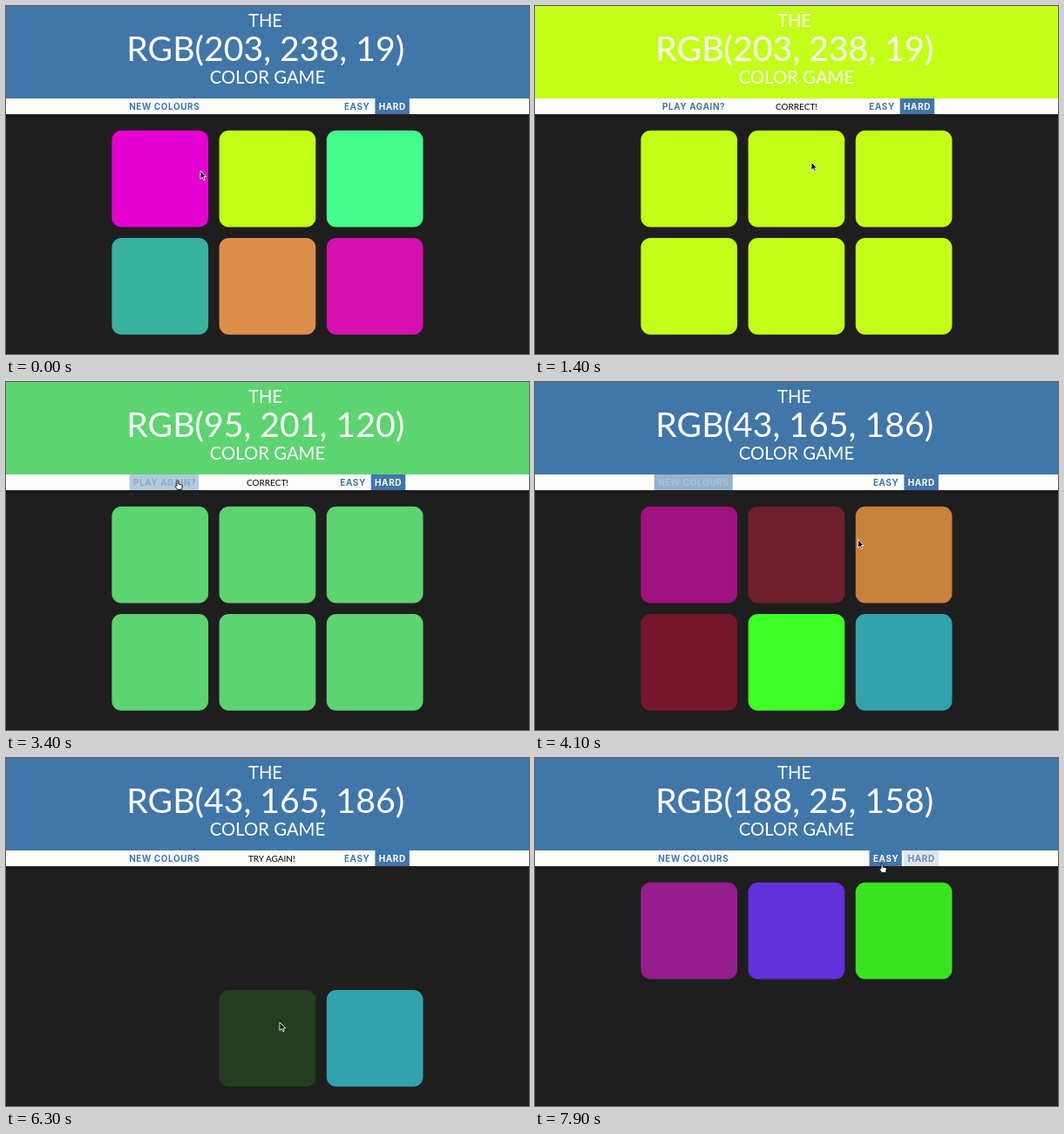
These frames come from a looping animation (600x399 px, 8 s). An HTML page:

```html
<!DOCTYPE html>
<html lang="en">
<head>
<meta charset="utf-8">
<title>Color game</title>
<style>
  html, body { margin: 0; height: 100%; overflow: hidden; background: #1f1e1f; }
  svg { display: block; width: 600px; height: 399px; }
  .head { font: 20.3px Lato, sans-serif; fill: #fff; text-anchor: middle; }
  .head .big { font-size: 39.2px; }
  .nav { font: 700 10px Inter, sans-serif; letter-spacing: .55px; }
  .message { font: 10px Lato, sans-serif; text-anchor: middle; }
</style>
</head>
<body>
<svg viewBox="0 0 600 399">
  <rect id="header" width="600" height="106"/>
  <g class="head">
    <text x="297.5" y="24.3">THE</text>
    <text id="title" class="big" x="297.7" y="63.3"></text>
    <text x="300" y="89.3">COLOR GAME</text>
  </g>
  <rect y="106" width="600" height="18" fill="#fdfdfc"/>
  <g id="nav" class="nav"></g>
  <text id="message" class="message" y="119"></text>
  <g id="board"></g>
  <path id="arrow" fill="#000" stroke="#fff" stroke-width=".9"
    d="M0 0V9.4L2.2 7.4L3.7 10.7L5.2 10L3.8 6.8H6.6Z"/>
  <path id="hand" fill="#fff" stroke="#000" stroke-width=".9"
    d="M-1 6V1a1 1 0 0 1 2 0V4L4.6 4.8Q5.4 5 5.3 6L4.6 10.5H-.2L-3 6.6Q-2.6 5.2-1 6Z"/>
</svg>
<script>
const LOOP = 8000, FADE = 300, EASY_AT = 7740;
const BLUE = '#4176a8', DARK = '#1f1e1f', WHITE = '#fdfdfc';
const LIME = '#c2ff19', GREEN = '#5cd46f', TEAL = '#31a3af';
const NEW_SPOT = [197, 113], EASY_SPOT = [398, 121];
const $ = id => document.getElementById(id);

const deal = (title, ...squares) =>
  ({ title, header: BLUE, label: 'NEW COLOURS', message: '', shift: 0, squares });
const win = color => ({
  header: color, label: 'PLAY AGAIN?', message: 'CORRECT!', shift: -4.7,
  squares: Array(6).fill(color)
});
const miss = i => ({ message: 'TRY AGAIN!', squares: { [i]: DARK } });

// Each click: its time, where the pointer is, and what it changes.
const clicks = [
  [0, [223, 189], deal('203, 238, 19', '#e600d0', LIME, '#44ff8c', '#38b2a0', '#dd8e4a', '#d610ae')],
  [800, [317, 179], win(LIME)],
  [2000, NEW_SPOT, deal('95, 201, 120', '#867371', GREEN, '#25351c', '#2200b8', '#6e3826', '#a594ac')],
  [2750, [285, 194], win(GREEN)],
  [3660, NEW_SPOT, deal('43, 165, 186', '#a0127f', '#6e1f2a', '#c8823c', '#75162d', '#40ff25', TEAL)],
  [4350, [420, 200], miss(2)],
  [4700, [275, 212], miss(1)],
  [5300, [188, 220], miss(0)],
  [5430, [185, 300], miss(3)],
  [6125, [314, 303], miss(4)],
  [6750, [420, 312], win(TEAL)],
  [EASY_AT, EASY_SPOT, deal('188, 25, 158', '#aa0084', '#7016e6', '#3cf200')]
];

const mix = (a, b, p) => a + (b - a) * p;
const clamp = p => Math.min(1, Math.max(0, p));
const easeOut = p => 1 - (1 - clamp(p)) ** 2.2;
const rgb = hex => [1, 3, 5].map(i => parseInt(hex.slice(i, i + 2), 16));
const blend = (a, b, p) => {
  const end = rgb(b);
  return `rgb(${rgb(a).map((v, i) => mix(v, end[i], p))})`;
};
const lastIndex = (list, t) => Math.max(0, list.findLastIndex(([at]) => at <= t));

// The pointer rests after a click, then glides to the next one.
function pointerAt(t) {
  const n = lastIndex(clicks, t);
  const [from, a] = clicks[n], [to, b] = clicks[n + 1] || [LOOP, a];
  const p = clamp(((t - from) / (to - from) - .5) / .2), eased = p * p * (3 - 2 * p);
  return a.map((v, i) => mix(v, b[i], eased));
}

function hovers(t, left, right) {
  const [x, y] = pointerAt(t);
  return y > 106 && y < 124 && x > left && x < right;
}
const newOn = t => hovers(t, 137, 227);
const easyOn = t => t >= EASY_AT || hovers(t, 384, 421);
const hardOn = t => t < EASY_AT || hovers(t, 423, 463);

// How highlighted a button is, from the time since it last switched.
function highlight(isOn, t) {
  const on = isOn(t);
  let age = 0;
  while (age < FADE && isOn(t - age) === on) age += 5;
  const p = easeOut(age / FADE);
  return on ? p : 1 - p;
}

function set(node, attributes) {
  for (const name in attributes) node.setAttribute(name, attributes[name]);
}
function add(parent, tag, attributes) {
  const node = document.createElementNS('http://www.w3.org/2000/svg', tag);
  set(node, attributes);
  return parent.appendChild(node);
}

function makeButton(label) {
  const box = add($('nav'), 'rect', { y: 106, height: 18 });
  const text = add($('nav'), 'text', { y: 119 });
  text.textContent = label;
  return { box, text };
}
const newButton = makeButton(''), easyButton = makeButton('EASY'), hardButton = makeButton('HARD');

function drawButton({ box, text }, x, width, lit) {
  set(box, { x, width, fill: blend(WHITE, BLUE, lit) });
  set(text, { x: x + 4.4, fill: blend(BLUE, WHITE, lit) });
}

const squares = Array.from({ length: 6 }, (_, i) => ({
  node: add($('board'), 'rect', {
    x: 121.4 + i % 3 * 123.2, y: i < 3 ? 142.8 : 266, width: 110.7, height: 110.7, rx: 11
  }),
  colors: clicks.filter(([, , s]) => i in s.squares).map(([at, , s]) => [at, s.squares[i]])
}));

function squareColor(colors, t) {
  const n = lastIndex(colors, t), [at, color] = colors[n];
  return n ? blend(colors[n - 1][1], color, easeOut((t - at) / FADE)) : color;
}

function drawPointer(t) {
  const onButton = hovers(t, 137, 227) || hovers(t, 384, 463);
  const transform = `translate(${pointerAt(t)})`;
  set($('arrow'), { transform, visibility: onButton ? 'hidden' : 'visible' });
  set($('hand'), { transform, visibility: onButton ? 'visible' : 'hidden' });
}

function draw(t) {
  const past = clicks.slice(0, lastIndex(clicks, t) + 1);
  const state = Object.assign({}, ...past.map(([, , change]) => change));
  const won = state.shift < 0;
  set($('header'), { fill: state.header });
  $('title').textContent = `RGB(${state.title})`;
  $('message').textContent = state.message;
  set($('message'), { x: won ? 300 : 304.8 });
  newButton.text.textContent = state.label;
  drawButton(newButton, won ? 141.6 : 136.8, won ? 79.6 : 90, highlight(newOn, t));
  drawButton(easyButton, 383.6 + state.shift, 37.2, highlight(easyOn, t));
  drawButton(hardButton, 423.4 + state.shift, 39.5, highlight(hardOn, t));
  squares.forEach(({ node, colors }, i) => set(node, {
    fill: squareColor(colors, t),
    visibility: i > 2 && t >= EASY_AT ? 'hidden' : 'visible'
  }));
  drawPointer(t);
}

const start = performance.now();
function tick() {
  draw((performance.now() - start) % LOOP);
  requestAnimationFrame(tick);
}
tick();
</script>
</body>
</html>
```
